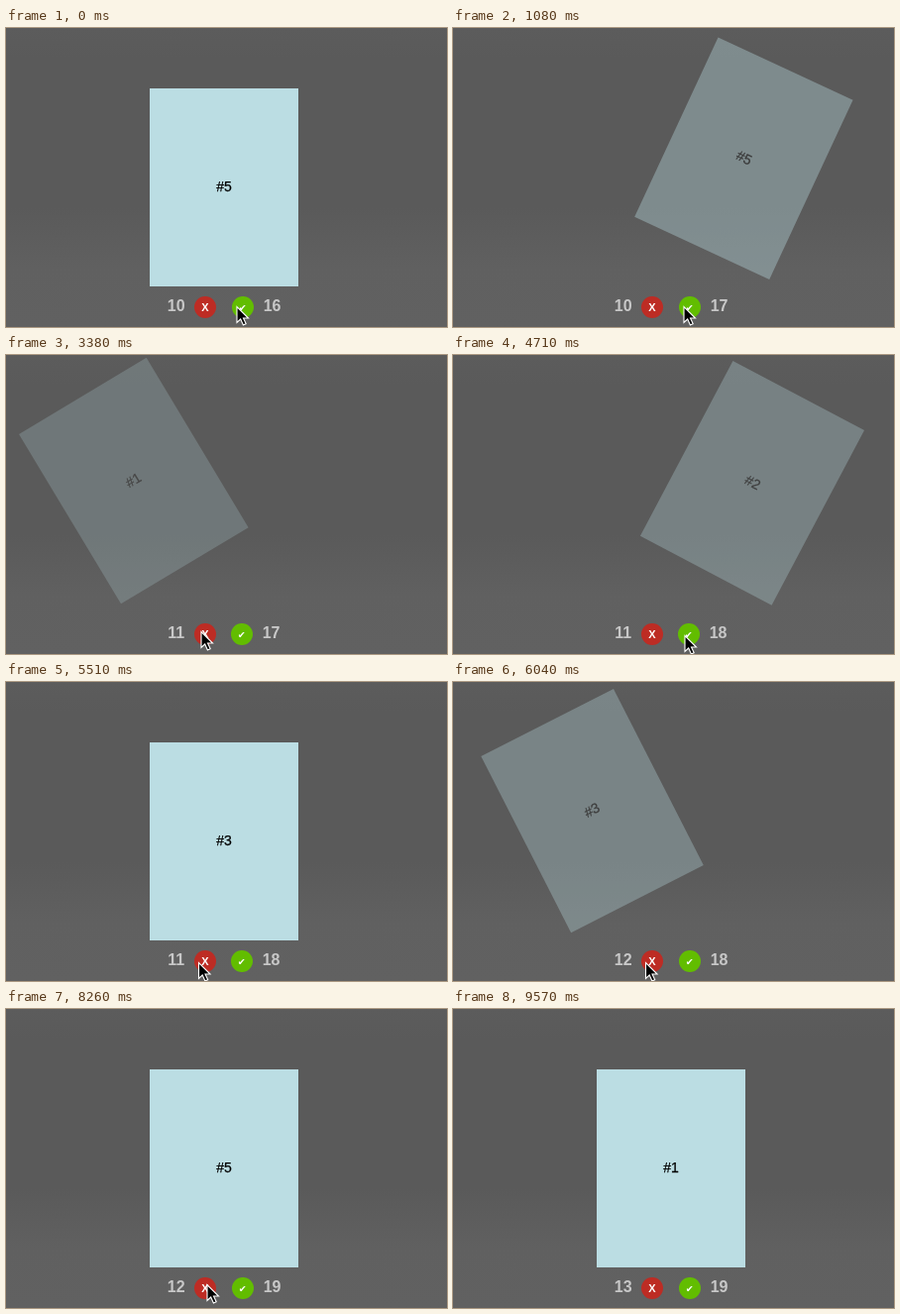
Write an HTML page that moves like this. It is 445 by 302 pixels and loops after 9900 ms.

```html
<!DOCTYPE html>
<html lang="en">
<head>
<meta charset="utf-8">
<title>Swipe cards</title>
<style>
html, body { margin: 0; width: 100%; height: 100%; overflow: hidden; background: #5d5d5d; }
svg { display: block; font-family: "Liberation Sans", Arial, sans-serif; }
.count { font-size: 16px; font-weight: bold; fill: #c8c8c8; }
.icon { fill: #fff; text-anchor: middle; }
#label { font-size: 14px; text-anchor: middle; stroke: #000; stroke-width: .25; }
</style>
</head>
<body>
<svg width="445" height="302" viewBox="0 0 445 302">
  <defs>
    <linearGradient id="bg" x2="0" y2="1">
      <stop stop-color="#5c5c5c"/>
      <stop offset=".1" stop-color="#5a5a5a"/>
      <stop offset=".6" stop-color="#5a5a5a"/>
      <stop offset=".8" stop-color="#606060"/>
      <stop offset="1" stop-color="#616161"/>
    </linearGradient>
  </defs>
  <rect width="445" height="302" fill="url(#bg)"/>
  <g id="card">
    <rect x="-75" y="-100" width="150" height="200" fill="#bbdde3"/>
    <text id="label" y="4"></text>
  </g>
  <text id="no" class="count" x="171.7" y="286" text-anchor="middle"></text>
  <circle cx="201" cy="282" r="11" fill="#bd2c24"/>
  <text class="icon" x="201" y="286" font-size="11" font-weight="bold">X</text>
  <g id="right">
    <circle cx="239" cy="282" r="11" fill="#62bd00"/>
    <text class="icon" x="238.7" y="286" font-size="9.5" font-family="DejaVu Sans, sans-serif">✔</text>
    <text id="yes" class="count" x="259.7" y="286"></text>
  </g>
  <path id="cursor" d="M0 .5V16.5L3.7 13L6.4 19L9.2 17.8L6.5 12H11.5Z" stroke="#fff" stroke-width="1.1"/>
</svg>
<script>
const LOOP = 9900, TICK = 88.85;
const SWIPE = 1000, CLICK_DELAY = 32, NEXT_CARD = 765, MOVE = 330;
const $ = id => document.getElementById(id);

// swipe starts; directions alternate right, left
const swipes = [705, 2903, 4299, 5647, 6956, 8560];

// cursor moves: start time and destination
const moves = [
  [-MOVE, 233, 281], [1535, 187, 277], [2580, 197, 279], [3660, 234, 283],
  [5130, 194.5, 283], [6410, 234, 283], [7920, 203, 278], [9170, 375, 310]
];

const smooth = f => f * f * (3 - 2 * f);

// CSS "ease": cubic-bezier(.25, .1, .25, 1)
function ease(x) {
  let lo = 0, hi = 1;
  for (let i = 0; i < 24; i++) {
    const s = (lo + hi) / 2;
    if (.75 * s * (1 - s) + s ** 3 < x) lo = s; else hi = s;
  }
  return .3 * lo * (1 - lo) ** 2 + 3 * (1 - lo) * lo * lo + lo ** 3;
}

function cursorAt(t) {
  const i = moves.findLastIndex(m => t >= m[0]);
  const [start, x, y] = moves[i];
  const [, fromX, fromY] = moves[Math.max(0, i - 1)];
  const f = smooth(Math.min(1, (t - start) / MOVE));
  return [fromX + (x - fromX) * f, fromY + (y - fromY) * f];
}

function draw(time) {
  // the picture advances in steps
  const t = Math.floor((time + 6) / TICK) * TICK;
  const clicked = swipes.filter(s => t >= s + CLICK_DELAY).length;
  const done = swipes.filter(s => t >= s + NEXT_CARD).length;
  const p = clicked > done ? ease((t - swipes[done]) / SWIPE) : 0;
  const dir = done % 2 ? -1 : 1;

  const x = 220 + dir * 117.7 * p, y = 161 - 59.3 * p + 19.9 * p * p;
  $('card').setAttribute('transform', `translate(${x} ${y}) rotate(${dir * 40 * p})`);
  $('card').setAttribute('opacity', 1 - p);
  $('label').textContent = '#' + ((done + 4) % 5 + 1);

  const no = 10 + Math.floor(clicked / 2);
  $('no').textContent = no;
  $('yes').textContent = 16 + Math.ceil(clicked / 2);
  // "11" is set narrower, so the right half moves in
  $('right').setAttribute('transform', `translate(${no === 11 ? -1 : 0} 0)`);
  $('cursor').setAttribute('transform', `translate(${cursorAt(t)})`);
}

function frame() {
  draw(performance.now() % LOOP);
  requestAnimationFrame(frame);
}
frame();
</script>
</body>
</html>
```
